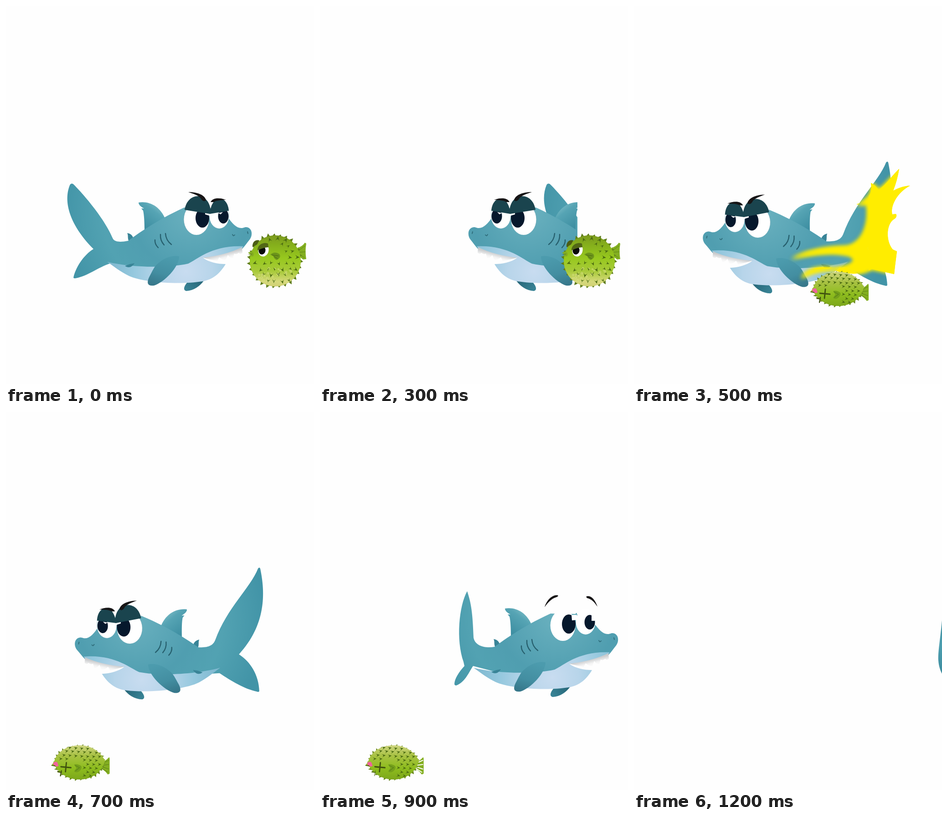
Write an HTML page with a canvas that moves like this. It is 676 px wide and 829 px high and loops after 1.3 s.

```html
<!DOCTYPE html>
<html lang="en">
<head>
<meta charset="utf-8">
<title>Shark and puffer</title>
<style>
html, body { margin: 0; width: 100%; height: 100%; overflow: hidden; background: #fefefe; }
canvas { display: block; }
</style>
</head>
<body>
<canvas id="stage" width="676" height="829"></canvas>
<script>
const ctx = document.getElementById('stage').getContext('2d');
const STEP = 100, LOOP = 1300, STRIDE = 119;
const INK = '#06182c', SPIKE = '#4c6c12';

function gradient(g, stops) {
  stops.forEach(([at, color]) => g.addColorStop(at, color));
  return g;
}
const linear = (x0, y0, x1, y1, ...stops) => gradient(ctx.createLinearGradient(x0, y0, x1, y1), stops);
const radial = (x, y, r, ...stops) => gradient(ctx.createRadialGradient(x, y, 0, x, y, r), stops);

function fill(d, color) {
  ctx.fillStyle = color;
  ctx.fill(typeof d === 'string' ? new Path2D(d) : d);
}
function line(d, color, width) {
  ctx.strokeStyle = color;
  ctx.lineWidth = width;
  ctx.lineCap = 'round';
  ctx.stroke(new Path2D(d));
}
function oval(x, y, rx, ry, color, tilt = 0) {
  ctx.beginPath();
  ctx.ellipse(x, y, rx, ry, tilt, 0, 7);
  ctx.fillStyle = color;
  ctx.fill();
}
function scoped(draw) {
  ctx.save();
  draw();
  ctx.restore();
}
function clipTo(x, y, w, h) {
  ctx.beginPath();
  ctx.rect(x, y, w, h);
  ctx.clip();
}
function random(seed) {
  return () => (seed = seed * 16807 % 2147483647) / 2147483647;
}

// Shark, facing right
const HEAD = 'L268 515C281 506 325 472 391 442L447 443L476 452L488 465C497 477 506 488 518 487' +
  'C523 486 524 485 527 485C541 486 542 503 535 512C529 519 524 527 518 533C490 547 455 552 432 552L400 568L290 575Z';
const TAIL = {
  rest: 'M290 575L230 564C200 574 180 592 153 597Q150 598 148 596C152 575 170 546 192 533' +
    'C135 475 127 425 140 393Q142 388 147 390C160 402 215 462 235 511C240 518 252 518 268 515',
  up: 'M290 575L224 573C200 590 170 610 143 616Q139 618 138 615C138 580 155 550 180 533' +
    'C118 470 118 400 127 348Q128 342 132 346C150 388 203 430 231 500C237 514 250 516 268 515',
  side: 'M290 575L221 557C212 570 205 590 186 599Q181 601 180 597C180 585 190 570 202 557' +
    'L200 548C183 500 190 425 208 393C217 420 220 440 222 495C226 515 250 518 268 515'
};
const BELLY = 'M222 561C270 573 350 576 400 565C420 556 452 524 521 527L517 533' +
  'C490 547 460 553 432 552C445 562 465 566 482 566C470 586 455 600 430 604' +
  'C380 612 300 606 270 592C250 582 238 572 222 561Z';
const skin = radial(405, 450, 285, [0, '#6ab1bf'], [.45, '#509eb0'], [.68, '#52a2b2'], [1, '#4294a7']);
const bellySkin = radial(395, 582, 165, [0, '#c8dcf0'], [.35, '#b8d5ea'], [.7, '#95c8de'], [1, '#80b9d0']);
const finSkin = linear(350, 548, 330, 612, [0, '#4c9bad'], [.6, '#438ea1'], [1, '#37788b']);
const dorsalSkin = linear(340, 440, 306, 485, [0, '#79bac5'], [.3, '#56a4b4'], [1, '#3e8fa2']);
const teethSkin = linear(478, 542, 482, 559, [0, '#c9cbcd'], [.55, '#f4f4f4'], [1, '#ffffff']);

function eyes(worried) {
  if (!worried) {
    oval(418, 468, 28.5, 34.5, '#78afbb');
    oval(468, 460, 22, 28.5, '#78afbb');
  }
  oval(418, 468, 27.5, 34, '#fff');
  oval(468, 460, 21.5, 28, '#fff');
  oval(431, 465, 15, 21, INK);
  oval(477, 461, 11.5, 16, INK);
  if (worried) {
    fill('M437 445L449 445L449 456L438 457Z', '#fff');
    fill('M481 446L489 446L488 458L481 458Z', '#fff');
    fill('M446 441L449 441L447.5 446Z', '#4e9eb0');
    fill('M378 428C383 411 396 400 407 402Q409 404 404 406C393 409 385 418 378 428Z', '#171516');
    fill('M469 405C478 400 489 411 494 427C487 417 481 410 471 408Z', '#171516');
    return;
  }
  fill('M437 453L449 456L447 460L437 457Z', '#fff');
  fill('M466 454L476 452L471 457Z', '#fff');
  fill('M392 447C395 428 407 417 421 417C437 417 447 430 449 447L448 456Z', '#1a444e');
  fill('M447 456C449 434 459 422 469 422C481 423 488 435 489 449Z', '#1a444e');
  fill('M400 408C421 408 437 415 439 426C435 430 430 427 427 421C421 415 412 412 400 408Z', '#171516');
  fill('M449 430C454 420 468 420 483 425C471 426 462 426 456 430Z', '#171516');
}

function shark(tail, worried) {
  fill('M398 606C389 616 389 624 396 625C412 624 427 614 435 601Z', linear(425, 602, 398, 625, [0, '#28697b'], [1, '#388395']));
  fill('M304 497C304 472 303 458 301 449L297 444L303 444C294 439 291 435 291 431C315 427 339 440 350 468Z', dorsalSkin);
  fill('M270 517C266 509 269 503 266 498C273 499 279 503 280 512Z', '#398497');
  fill(TAIL[tail] + HEAD, skin);
  fill(BELLY, bellySkin);
  fill('M261 570C268 575 276 574 282 564L272 566Z', '#398497');
  fill('M432 552Q480 547 518 529L519 541Q514 546 511 541Q506 546 501 543L498 553Q490 552 487 546' +
    'L482 558Q472 555 468 551L464 559Q452 557 432 552Z', teethSkin);
  fill('M380 549C380 573 347 606 325 613C311 615 308 608 314 595C322 580 325 572 332 566C347 552 365 546 380 549Z', finSkin);
  line('M327 513Q326 522 334 530M339 501Q338 514 347 524M350 499Q351 514 363 523', '#27606e', 2.4);
  line('M497 501Q499 506 502 502M530 495L531 499', '#2d6a78', 1.8);
  eyes(worried);
}

function swimRight(dx, tail, worried) {
  scoped(() => { ctx.translate(dx, 0); shark(tail, worried); });
}
// mirror is the sum of a point's x before and after the flip
function leftPose(mirror, tilt) {
  return new DOMMatrix().translate(460, 430).rotate(tilt).translate(mirror - 460, -430).scale(-1, 1);
}
function swimLeft(pose, tail) {
  scoped(() => { ctx.setTransform(pose); shark(tail); });
}
const struckPose = leftPose(688, -1.85);

// Puffer
function thorn(x, y, angle, size) {
  scoped(() => {
    ctx.translate(x, y);
    ctx.rotate(angle);
    ctx.scale(size, size);
    fill('M-4 -4Q0 -2 5 0Q0 2 -4 4Q0 1 -1 0Q0 -1 -4 -4Z', SPIKE);
  });
}
function rim(cx, cy, rx, ry, count, length, lean, color) {
  const p = new Path2D(), step = Math.PI * 2 / count;
  const at = (a, grow) => [cx + Math.cos(a) * (rx + grow), cy + Math.sin(a) * (ry + grow)];
  for (let i = 0; i < count; i++) {
    const a = i * step;
    p.moveTo(...at(a - step * .4, -2));
    p.lineTo(...at(a + lean, length * (.75 + .25 * Math.sin(i * 5))));
    p.lineTo(...at(a + step * .4, -2));
  }
  fill(p, color);
}
const puffSkin = linear(0, 502, 0, 616, [0, '#7b991e'], [.2, '#86b01c'], [.45, '#97c81e'], [.7, '#a8ca3a'], [.9, '#d6d97c'], [1, '#cfcf72']);
const deadSkin = linear(0, 582, 0, 660, [0, '#d0d683'], [.3, '#a9c244'], [.65, '#8ebd1e'], [1, '#7ba51b']);

function puffer() {
  const rnd = random(77);
  fill('M640 530Q650 528 656 519L659 521Q656 538 659 555L652 556Q646 550 639 549Z', '#83af20');
  line('M644 535L656 526M645 540L657 539M645 545L655 552', '#5e8416', 1);
  rim(591, 559, 55.5, 55.5, 27, 7.5, .03, '#5f7d1b');
  oval(591, 559, 56, 56, puffSkin);
  for (let y = 511; y < 614; y += 13)
    for (let x = 541 + y % 2 * 8; x < 648; x += 16) {
      const px = x + rnd() * 5 - 2, py = y + rnd() * 5 - 2;
      const dx = px - 591, dy = py - 559;
      if (Math.hypot(dx, dy) > 52 || (px < 605 && py > 516 && py < 560)) continue;
      thorn(px, py, Math.atan2(dy + 12, dx), .8 + rnd() * .4);
    }
  ctx.strokeStyle = '#dce38d';
  ctx.lineWidth = .9;
  for (let i = 0; i < 22; i++) {
    ctx.beginPath();
    ctx.arc(555 + rnd() * 72, 574 + rnd() * 32, 1 + rnd() * 1.4, 0, 7);
    ctx.stroke();
  }
  fill('M541 529C540 518 547 512 556 514L551 523Z', '#4c5d15');
  oval(565, 535, 11.5, 14.5, '#fff', .15);
  oval(562, 536, 7.5, 9, '#090b08', .2);
  fill('M552 533C554 523 565 517 575 521L576 529Q564 530 552 536Z', '#526716');
  fill('M531 541L539 538Q547 543 542 549L533 549L537 545Z', '#83ac22');
  line('M533 545L540 544', '#577319', 1);
  fill('M580 545Q590 537 600 544Q605 552 594 557Q588 554 587 549Z', '#6d951b');
  line('M584 546L598 548M588 549L596 554', '#486611', 1);
}

function deadPuffer(dx, dy, fading) {
  scoped(() => {
    ctx.translate(dx, dy);
    fill('M490 621Q502 622 514 609L515 612L515 645L511 647Q502 634 491 634Z', '#83ae20');
    line('M497 623L513 616M498 627L513 625M498 630L513 635M497 633L511 642', fading ? '#fefefe' : '#5a7f17', fading ? 2 : 1);
    rim(448, 621, 54, 36, 30, 5, .05, '#68861f');
    fill('M388 626Q394 618 396 611C407 592 425 583 450 583C479 583 498 602 505 617' +
      'C497 642 477 658 449 658C421 658 404 642 395 629Z', deadSkin);
    for (let row = 0; row < 8; row++)
      for (let x = 401 + row % 2 * 6; x < 500; x += 13) {
        const y = 589 + row * 8.5 + Math.sin(x) * 2;
        const out = ((x - 448) / 50) ** 2 + ((y - 620) / 35) ** 2 > 1;
        if (out || (x < 459 && y > 613)) continue;
        thorn(x, y, -.3 + row * .08, .95);
      }
    fill('M437 625Q446 623 453 629Q455 635 447 641Q440 644 437 640L442 633Z', '#75a01b');
    line('M439 627L449 632M440 639L449 632', '#58811a', 1.2);
    fill('M391 622Q395 617 400 620L403 628Q397 632 392 626Z', '#f0649d');
    line('M388 627L395 628', '#4c6510', 2);
    line('M408 630L430 632M420 621L418 641', '#40520f', 2.8);
    line('M401 640L409 643M409 639L407 650', '#40520f', fading ? 1 : 2.4);
  });
}

const SMEAR = 'M606 394C590 395 579 400 569 405Q578 382 582 357C568 370 555 390 537 403Q529 392 520 388' +
  'Q523 407 515 417Q504 430 488 435Q501 438 511 434C518 482 499 522 466 527C420 528 378 535 345 555' +
  'C390 544 440 538 474 548C492 557 482 570 440 575C400 568 375 579 367 598C385 586 410 579 440 580' +
  'C475 591 500 589 522 577L571 588L573 570L577 538L568 534C552 515 553 476 573 466Q578 461 575 456' +
  'L567 457C562 440 577 409 606 394Z';
const YELLOW = '#ffed00';

// soft edge on the skin, hard edge on the open background
function smear() {
  const shape = new Path2D(TAIL.up + HEAD), body = new Path2D(), outside = new Path2D();
  shape.addPath(new Path2D(BELLY));
  body.addPath(shape, struckPose);
  outside.rect(0, 0, 676, 829);
  outside.addPath(body);
  scoped(() => {
    ctx.clip(body);
    ctx.filter = 'blur(5px)';
    fill(SMEAR, YELLOW);
    fill(SMEAR, YELLOW);
  });
  scoped(() => {
    ctx.clip(outside, 'evenodd');
    fill(SMEAR, YELLOW);
  });
  scoped(() => {
    clipTo(515, 340, 100, 255);
    fill(SMEAR, YELLOW);
  });
}

function lastTail() {
  fill('M676 457C672 500 667 525 668 545C669 559 673 568 676 574Z',
    linear(0, 457, 0, 574, [0, '#438fa0'], [.45, '#4d9fb0'], [1, '#3d8c9e']));
}

function draw(step) {
  ctx.clearRect(0, 0, 676, 829);
  if (step < 5) {
    scoped(() => {
      clipTo(0, 0, step === 3 ? 565 : 624, 829);
      if (step < 4) swimRight(step * STRIDE, 'rest');
      if (step > 2) swimLeft(leftPose(865 - (step - 3) * STRIDE, 0), 'rest');
    });
    puffer();
  } else if (step < 8) {
    swimLeft(struckPose, 'up');
  } else if (step < 12) {
    swimRight(115 + (step - 9) * STRIDE, 'side', true);
  } else {
    lastTail();
  }
  if (step === 5) smear();
  if (step >= 5 && step < 10) {
    const fall = Math.min(1, (step - 5) / 2);
    deadPuffer(-287.5 * fall, 148 * fall, step === 9);
  }
}

let shown = -1;
function tick() {
  const step = Math.floor(performance.now() % LOOP / STEP);
  if (step !== shown) draw(shown = step);
  requestAnimationFrame(tick);
}
tick();
</script>
</body>
</html>
```
